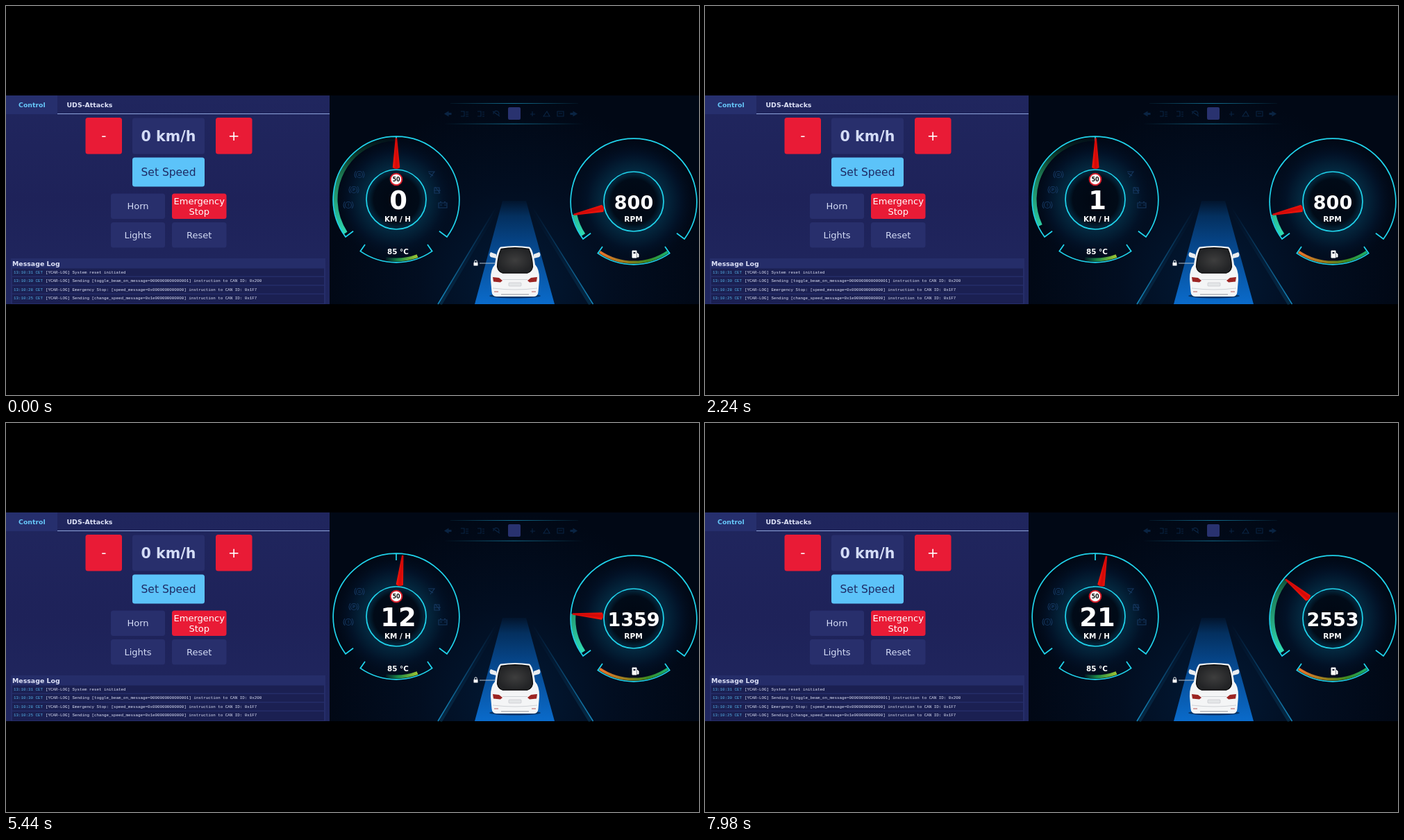
An HTML page for the animation above (8 s loop, 998 by 561 pixels).

```html
<!DOCTYPE html>
<html>
<head>
<meta charset="utf-8">
<style>
html, body { margin: 0; width: 100%; height: 100%; overflow: hidden; background: #000; }
svg { display: block; width: 100vw; height: 100vh; }
text { font-family: "DejaVu Sans", sans-serif; fill: #fff; white-space: pre; }
.b { font-weight: bold; }
.m { text-anchor: middle; }
.log text { font: 5.83px "Liberation Mono", monospace; fill: #dfe3f8; }
.log .time { fill: #55b4ea; }
.dim { fill: none; stroke: #15375f; stroke-width: 1.1; }
.dim text { font-size: 6px; font-weight: bold; fill: #15375f; stroke: none; }
.line { fill: none; stroke: #20d4ec; stroke-width: 1.7; }
</style>
</head>
<body>
<svg viewBox="0 0 998 561">
<defs>
  <linearGradient id="panel" x2="0" y2="1">
    <stop stop-color="#20265e"/><stop offset=".5" stop-color="#1e2259"/><stop offset="1" stop-color="#20275f"/>
  </linearGradient>
  <radialGradient id="night" gradientUnits="userSpaceOnUse" cx="732" cy="400" r="270">
    <stop stop-color="#021a36"/><stop offset=".5" stop-color="#020e21"/><stop offset="1" stop-color="#010815"/>
  </radialGradient>
  <radialGradient id="glow">
    <stop offset="0" stop-color="#010712"/><stop offset=".36" stop-color="#010b18"/>
    <stop offset=".47" stop-color="#042a40"/><stop offset=".5" stop-color="#04283f"/>
    <stop offset=".75" stop-color="#021227"/><stop offset="1" stop-color="#020c1d" stop-opacity="0"/>
  </radialGradient>
  <linearGradient id="road" x2="0" y2="1">
    <stop stop-color="#04305f" stop-opacity=".15"/><stop offset=".15" stop-color="#04305f"/>
    <stop offset=".4" stop-color="#064486"/><stop offset="1" stop-color="#0a6bcb"/>
  </linearGradient>
  <linearGradient id="lane" gradientUnits="userSpaceOnUse" x1="0" y1="290" x2="0" y2="430">
    <stop stop-color="#0a4a80" stop-opacity="0"/><stop offset="1" stop-color="#1489bd"/>
  </linearGradient>
  <linearGradient id="rail" gradientUnits="userSpaceOnUse" x1="630" x2="832" y1="0" y2="0">
    <stop stop-color="#137a9c" stop-opacity="0"/><stop offset=".5" stop-color="#126f90"/>
    <stop offset="1" stop-color="#137a9c" stop-opacity="0"/>
  </linearGradient>
  <linearGradient id="power" gradientUnits="userSpaceOnUse" x1="0" y1="191" x2="0" y2="330">
    <stop stop-color="#1a7a3c" stop-opacity=".05"/><stop offset=".4" stop-color="#23905f" stop-opacity=".85"/>
    <stop offset="1" stop-color="#30dcb4"/>
  </linearGradient>
  <linearGradient id="heat" gradientUnits="userSpaceOnUse" x1="545" x2="594" y1="0" y2="0">
    <stop stop-color="#168a50" stop-opacity="0"/><stop offset=".4" stop-color="#1a8a48"/><stop offset="1" stop-color="#a4c832"/>
  </linearGradient>
  <linearGradient id="fuel" gradientUnits="userSpaceOnUse" x1="854" x2="954" y1="0" y2="0">
    <stop stop-color="#f0742c"/><stop offset=".45" stop-color="#86801c"/>
    <stop offset=".7" stop-color="#3c8a20"/><stop offset="1" stop-color="#18b070"/>
  </linearGradient>
  <linearGradient id="red"><stop stop-color="#ff1a0a"/><stop offset=".5" stop-color="#d00808"/><stop offset="1" stop-color="#f01408"/></linearGradient>
  <radialGradient id="glass"><stop stop-color="#3e3e3e"/><stop offset="1" stop-color="#232426"/></radialGradient>
  <path id="needle" d="M-1.200 -88.500H1.200L5.200 -46Q0 -42 -5.200 -46Z" fill="url(#red)"/>
</defs>

<!-- control panel -->
<rect y="129" width="466" height="301" fill="url(#panel)"/>
<rect y="129" width="74" height="27" fill="#262f6d"/>
<path d="M74 155.500H466" stroke="#8ea4dc"/>
<text class="b" x="18" y="146" font-size="9.4" style="fill:#67c8fa">Control</text>
<text class="b" x="87.5" y="146" font-size="9.4" style="fill:#dfe3f8">UDS-Attacks</text>
<g id="buttons"></g>
<rect x="7" y="364" width="453" height="66" fill="#252d69"/>
<text class="b" x="9" y="374.500" font-size="9.4" style="fill:#dfe3f8">Message Log</text>
<g class="log" id="log"></g>

<!-- dashboard -->
<rect x="466" y="129" width="532" height="301" fill="url(#night)"/>
<path d="M715 281H749L790 430H675Z" fill="url(#road)"/>
<g fill="none" stroke="url(#lane)">
  <path d="M708 290L625 430M756 290L842 430" stroke-width="6" opacity=".2"/>
  <path d="M706 290L622 430M758 290L845.500 430" stroke-width="1.500"/>
</g>
<path d="M640 140.5H824M632 170H832" fill="none" stroke="url(#rail)" stroke-width="1.2"/>
<g class="dim" style="stroke:#0a2443">
  <path d="M632 155.500l5-3v2h4v2h-4v2zM822 155.500l-5-3v2h-4v2h4v2z" fill="#0a2443"/>
  <path d="M655 152h5v7h-5M662 153h4M662 156h4M662 159h4M679 152h5v7h-5M686 153h3M686 156h3M686 159h3M701 152l10 7M702 156a4 4 0 1 1 7 2M755 156h7M758 152v7M774 159l5-7 4 7zM794 152h9v7h-9zM796 155h5"/>
</g>
<rect x="723" y="146" width="18" height="18" rx="2" fill="#29326f"/>

<g id="gauges"></g>
<g class="dim" id="lamps"></g>
<g class="dim">
  <path d="M608 239h9l-6 8M609 241l6 4M617 262h7v8h-7zM618 261l7 9M616 266h10M623 284h12v7h-12zM625 282.500h2M631 282.500h2M625 287h3M631 287h3"/>
</g>
<path id="speedBand" fill="none" stroke="url(#power)" stroke-width="6"/>
<path id="rpmBand" fill="none" stroke="url(#power)" stroke-width="6.500"/>
<path id="rims" class="line"/>
<path id="heatBand" fill="none" stroke="url(#heat)" stroke-width="5"/>
<path id="fuelBand" fill="none" stroke="url(#fuel)" stroke-width="4"/>
<use id="speedNeedle" href="#needle"/>
<use id="rpmNeedle" href="#needle"/>
<circle cx="562" cy="250" r="8.300" fill="#fff" stroke="#d8202c" stroke-width="2"/>
<text class="b m" x="562" y="253" font-size="8" style="fill:#111">50</text>
<text class="b m" x="565" y="293" font-size="37" id="speed"></text>
<text class="b m" x="564" y="310.500" font-size="10.400">KM / H</text>
<text class="b m" x="564.500" y="357.500" font-size="10.400">85 °C</text>
<text class="b m" x="904" y="293" font-size="27" id="rpm"></text>
<text class="b m" x="903.500" y="310.500" font-size="10.600">RPM</text>
<path d="M902 353h6v10h-6zM909 356l2 2v4h-2" fill="#fff" stroke="#fff"/>
<path d="M903.500 355h3v2h-3z" fill="#06142a"/>

<!-- lock and car -->
<path d="M682 371H704" stroke="#b9c6d6"/>
<rect x="673.500" y="370" width="6" height="4.500" rx=".6" fill="#fff"/>
<path d="M674.800 370v-1.500a1.700 1.700 0 0 1 3.400 0V370" fill="none" stroke="#fff"/>
<ellipse cx="733" cy="418" rx="37" ry="3.500" fill="#05142c" opacity=".6"/>
<path d="M698 355q-3 4 0 7l8 2v-6zM768 355q3 4 0 7l-8 2v-6z" fill="#e9ecef"/>
<path d="M712 347.500Q733 344.500 754 347.500Q759 351 762 373Q768.500 380 768 395L766.500 412Q766 419 760 419H706Q700 419 699.500 412L698 395Q697.500 380 704 373Q707 351 712 347.500Z" fill="#f4f5f6"/>
<path d="M713 350.500Q733 347 753 350.500Q758 362 758.500 376Q757 383 751 385H715Q709 383 707.500 376Q708 362 713 350.500Z" fill="url(#glass)" stroke="#0c0d0e" stroke-width="1.300"/>
<path d="M701 391l9 1 5 4-3 2.500-10-1zM765 391l-9 1-5 4 3 2.500 10-1z" fill="#9c2422"/>
<path d="M715 394.500H751M701 407Q733 411 765 407" fill="none" stroke="#cfd2d6"/>
<rect x="724" y="399" width="18" height="5" rx="1" fill="#e4e6e8" stroke="#bfc2c6" stroke-width=".6"/>
<path d="M703 412H709M757 412H763" stroke="#b85a5c" stroke-width="1.200"/>
<path d="M713 416H753" stroke="#b4b7bb" stroke-width="1.500"/>
</svg>

<script>
const $ = id => document.getElementById(id);
const RED = '#e91b36', NAVY = '#282f6c', SPEED = [562, 279], RPM = [904, 282];

// Buttons: x, y, width, height, fill, text colour, font size, weight, text lines
const buttons = [
  [114.5, 161, 52.5, 52.5, RED, '#fff', 20, 400, '-'],
  [182, 161.5, 104, 52, NAVY, '#d4dcf6', 20.6, 700, '0 km/h'],
  [302, 161, 52.5, 52.5, RED, '#fff', 20, 400, '+'],
  [182, 218.5, 104, 42, '#5cc3f9', '#1e2c66', 15.5, 400, 'Set Speed'],
  [151, 270.5, 78, 36.5, NAVY, '#d4dcf6', 13, 400, 'Horn'],
  [239, 270.5, 78.5, 36.5, RED, '#fff', 13, 400, 'Emergency', 'Stop'],
  [151, 312, 78, 36.5, NAVY, '#d4dcf6', 13, 400, 'Lights'],
  [239, 312, 78.5, 36.5, NAVY, '#d4dcf6', 13, 400, 'Reset']
];
$('buttons').innerHTML = buttons.map(([x, y, w, h, fill, ink, size, weight, ...lines]) =>
  `<rect x="${x}" y="${y}" width="${w}" height="${h}" rx="3.5" fill="${fill}"/>` +
  lines.map((line, i) => `<text class="m" x="${x + w / 2}" y="${y + h / 2 + size * .36 + (i - (lines.length - 1) / 2) * 15}"
    style="font-size:${size}px;font-weight:${weight};fill:${ink}">${line}</text>`).join('')).join('');

const zeros = n => '0'.repeat(n), target = '] instruction to CAN ID: ';
const entries = [
  [31, 'System reset initiated'],
  [30, `Sending [toggle_beam_on_message=${zeros(15)}1${target}0x200`],
  [28, `Emergency Stop: [speed_message=0x${zeros(13)}${target}0x1F7`],
  [25, `Sending [change_speed_message=0x1e${zeros(12)}${target}0x1F7`]
];
$('log').innerHTML = entries.map(([sec, message], i) => {
  const y = 378.5 + i * 12.5;
  return `<rect x="9" y="${y}" width="449" height="${i < 3 ? 11 : 13}" fill="#1b2052"/>
    <text class="time" x="11" y="${y + 7.2}">13:10:${sec} CET</text>
    <text x="57" y="${y + 7.2}">[YCAR-LOG] ${message}</text>`;
}).join('');

// Angles are in degrees, clockwise from the top
const point = ([cx, cy], r, deg) => {
  const a = deg * Math.PI / 180;
  return `${(cx + r * Math.sin(a)).toFixed(2)} ${(cy - r * Math.cos(a)).toFixed(2)}`;
};
const arc = (c, r, from, to) =>
  `M${point(c, r, from)}A${r} ${r} 0 ${to - from > 180 ? 1 : 0} 1 ${point(c, r, to)}`;
const bracket = (c, from, to, inner) =>
  `M${point(c, inner, from)}L${arc(c, 90.8, from, to).slice(1)}L${point(c, inner, to)}`;

$('gauges').innerHTML = [SPEED, RPM].map(([x, y]) =>
  `<circle cx="${x}" cy="${y}" r="90" fill="url(#glow)"/><circle class="line" cx="${x}" cy="${y}" r="43"/>`).join('');
$('rims').setAttribute('d', [SPEED, RPM].map(c =>
  bracket(c, -126.5, 126.5, 77) + bracket(c, 145.3, 214.7, 79)).join('') + 'M562 188V198');
$('heatBand').setAttribute('d', arc(SPEED, 87, 159.5, 190));
$('fuelBand').setAttribute('d', arc(RPM, 87.5, 146, 214));
$('lamps').innerHTML = [[509, 243, '≡'], [501, 265, 'P'], [493, 287, '!']].map(([x, y, sign]) =>
  `<circle cx="${x}" cy="${y}" r="4.5"/><path d="M${x - 5} ${y - 5}q-4 5 0 10M${x + 5} ${y - 5}q4 5 0 10"/>
   <text class="m" x="${x}" y="${y + 2.2}">${sign}</text>`).join('');

const speedKeys = [[2220, 0], [2240, 1], [2780, 2], [3060, 3], [3340, 4], [3620, 5], [3800, 6],
  [3940, 7], [5440, 12], [6320, 16], [7980, 21]];
const bandKeys = [[2220, 123.5], [2240, 115.4], [2540, 103], [2780, 92], [3060, 76], [3340, 59],
  [3480, 45], [3620, 32], [3940, 5], [4000, 0]];
const rpmKeys = [[3800, 800], [3940, 825], [5440, 1359], [6320, 1825], [7980, 2553]];

function at(keys, t) {
  const i = keys.findIndex(key => key[0] > t);
  if (i < 0) return keys.at(-1)[1];
  if (!i) return keys[0][1];
  const [t0, a] = keys[i - 1], [t1, b] = keys[i];
  return a + (b - a) * (t - t0) / (t1 - t0);
}

const turn = (id, [x, y], deg) => $(id).setAttribute('transform', `translate(${x} ${y}) rotate(${deg})`);

function draw() {
  const t = performance.now() % 8000;
  const speed = at(speedKeys, t), rpm = at(rpmKeys, t), band = at(bandKeys, t);
  const rpmAngle = (rpm - 1215) * .0297 - 90;
  $('speed').textContent = Math.floor(speed + 1e-6);
  $('rpm').textContent = Math.floor(rpm + 1e-6);
  turn('speedNeedle', SPEED, speed * .5);
  turn('rpmNeedle', RPM, rpmAngle);
  $('speedBand').setAttribute('d', band ? arc(SPEED, 87.5, -band, 0) : '');
  $('rpmBand').setAttribute('d', arc(RPM, 87, -123.5, rpmAngle));
  requestAnimationFrame(draw);
}
draw();
</script>
</body>
</html>
```
